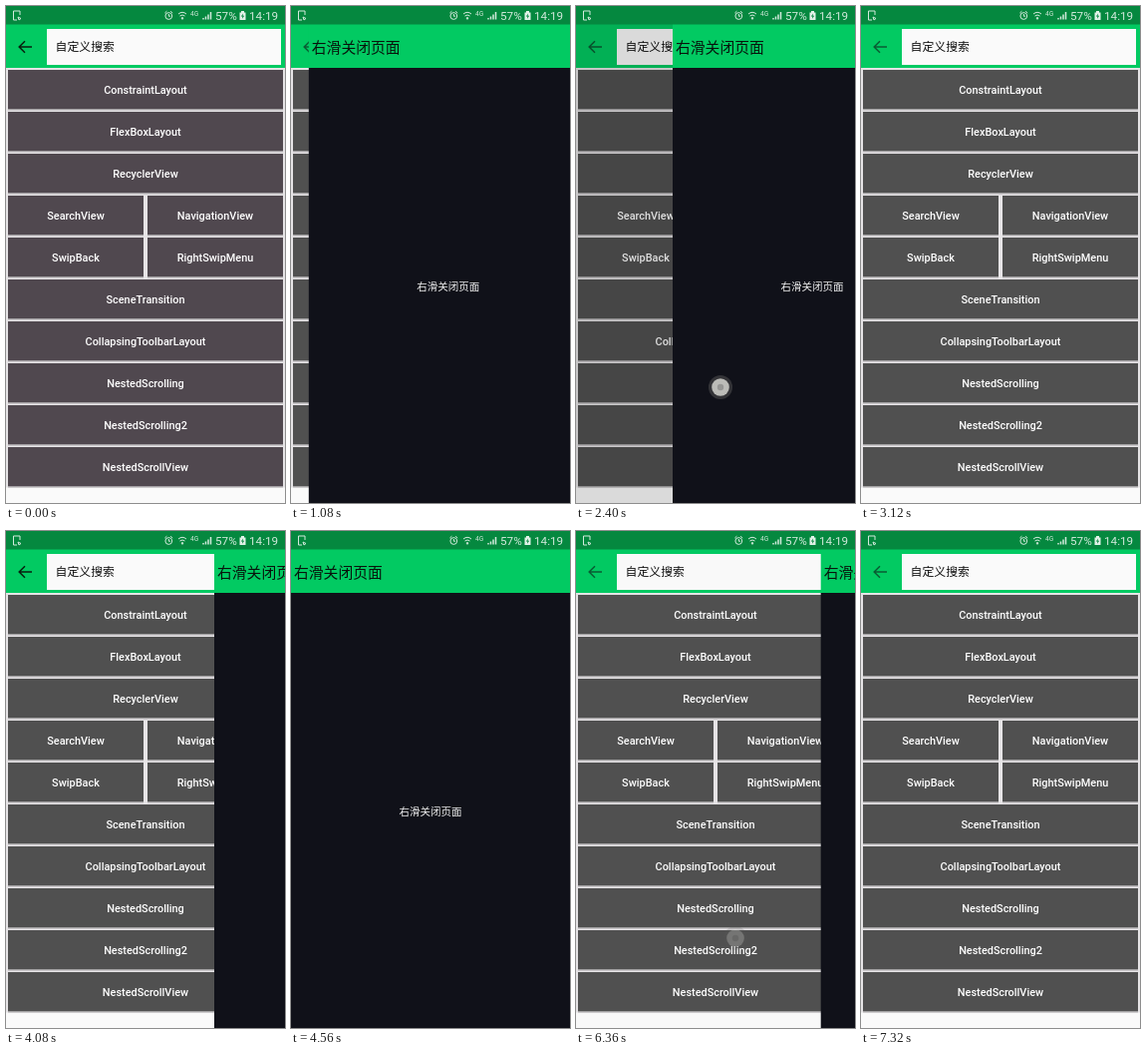
Animation, 280 px wide and 498 px high, one loop 7.44 s. Source, as an HTML page:

```html
<!DOCTYPE html>
<html lang="zh">
<head>
<meta charset="utf-8">
<style>
  html, body { margin: 0; width: 100%; height: 100%; overflow: hidden; background: #fafafa; }
  svg { display: block; width: 100%; height: 100%; }
  .cjk { font-family: "Noto Sans CJK SC", "Noto Sans CJK", sans-serif; }
  .label { font: 500 10.9px Roboto, sans-serif; fill: #fff; text-anchor: middle; }
  .status { font: 11.7px Roboto, sans-serif; fill: #d3eadc; }
</style>
</head>
<body>
<svg viewBox="0 0 280 498">
  <defs><clipPath id="body"><rect y="18" width="280" height="480"/></clipPath></defs>
  <g clip-path="url(#body)">
    <rect width="280" height="498" fill="#fafafa"/>
    <rect y="18" width="280" height="44" fill="#02ca62"/>
    <path id="arrow" d="M19 35.3L13.2 41L19 46.7M13.2 41H26" fill="none" stroke-width="1.5"/>
    <rect x="41" y="23" width="235" height="36" fill="#fafafa"/>
    <text class="cjk" x="49.5" y="45.4" font-size="11.9" fill="#111">自定义搜索</text>
    <rect y="62" width="280" height="420.5" fill="#e6e4e6"/>
    <g id="tiles"></g>
    <rect id="scrim" y="18" width="280" height="480"/>
    <g id="page">
      <rect y="18" width="280" height="44" fill="#02ca62"/>
      <rect y="62" width="280" height="436" fill="#101119"/>
      <text class="cjk" x="3" y="46.6" font-size="14.8" fill="#08140c">右滑关闭页面</text>
      <text class="cjk" x="140" y="284.8" font-size="10.5" fill="#f0f0f0" text-anchor="middle">右滑关闭页面</text>
    </g>
  </g>

  <rect width="280" height="18.5" fill="#05883f"/>
  <g fill="none" stroke="#d3eadc">
    <path d="M14 9V5H7.5V14H11M12 11L15 12.5L13 14Z"/>
    <circle cx="163.3" cy="10" r="3.4"/>
    <path d="M163.3 8V10.2H165M159.4 7L161.4 5.2M167.2 7L165.2 5.2"/>
    <path d="M173 8Q177 4.6 181 8M174.5 10Q177 8 179.5 10M176 12Q177 11.2 178 12L177 13.4Z"/>
    <path d="M198 13.5V12M200.5 13.5V10.5M203 13.5V8.5M205.5 13.5V6" stroke-width="1.5"/>
  </g>
  <path d="M234.5 6.5H236V5H239V6.5H240.5V14H234.5Z" fill="#e2f2e8"/>
  <path d="M238 7.5L235.8 10.6H237.4L236.8 13L239.2 9.8H237.6Z" fill="#05883f"/>
  <text class="status" x="185" y="10" style="font-size:6.5px">4G</text>
  <text class="status" x="210" y="14">57%</text>
  <text class="status" x="244" y="14">14:19</text>

  <g id="dot">
    <circle r="12" fill="#555" opacity=".5"/>
    <circle r="8.8" fill="#bcbcb8"/>
    <circle r="3.2" fill="#969694"/>
  </g>
</svg>
<script>
const $ = id => document.getElementById(id);
const LOOP = 7440, STEP = 120, WIDTH = 280;
const OPEN_MS = 500, CLOSE_MS = 400, FADE_MS = 320;

const rows = ['ConstraintLayout', 'FlexBoxLayout', 'RecyclerView',
  'SearchView|NavigationView', 'SwipBack|RightSwipMenu', 'SceneTransition',
  'CollapsingToolbarLayout', 'NestedScrolling', 'NestedScrolling2', 'NestedScrollView'];

// grip: distance from the finger to the page edge
const swipes = [
  { open: 706, grip: 48, path: [[1740, 40, 378], [2400, 145, 382], [2700, 195, 386]] },
  { open: 4012, grip: 32, path: [[4800, 30, 396], [5280, 82, 401], [6150, 160, 408]] }
];
const taps = [[240, 480], [3480, 3720]];

const clamp = v => Math.max(0, Math.min(1, v));
const easeOut = p => 1 - (1 - clamp(p)) ** 2;

function tile(x, y, w, name) {
  return `<rect x="${x}" y="${y + 1}" width="${w}" height="39.6" fill="#b9b7b9"/>
    <rect x="${x}" y="${y}" width="${w}" height="39.2"/>
    <text class="label" x="${x + w / 2}" y="${y + 23.9}">${name}</text>`;
}

$('tiles').innerHTML = rows.map((row, i) => {
  const names = row.split('|'), y = 64 + i * 42;
  return names.length === 1
    ? tile(2, y, 276, row)
    : names.map((name, k) => tile(2 + k * 140, y, 136, name)).join('');
}).join('');

function along(path, t) {
  const i = t < path[1][0] ? 0 : 1;
  const [a, b] = [path[i], path[i + 1]];
  const p = clamp((t - a[0]) / (b[0] - a[0]));
  return [a[1] + (b[1] - a[1]) * p, a[2] + (b[2] - a[2]) * p];
}

function pageState(t) {
  const { open, grip, path } = swipes[t < 3400 ? 0 : 1];
  const down = path[0][0], up = path[2][0];
  if (t < down) return { x: WIDTH * (1 - easeOut((t - open) / OPEN_MS)), shade: 0 };
  const [fx] = along(path, t);
  let x = Math.max(0, fx - grip);
  if (t > up) x += (WIDTH - x) * easeOut((t - up) / CLOSE_MS);
  return { x, shade: 0.3 * (1 - x / WIDTH) ** 2 };
}

function touchState(t) {
  const fade = up => 1 - clamp((t - up) / FADE_MS);
  for (const [down, up] of taps)
    if (t >= down && t < up + FADE_MS) return { x: 70, y: 254, alpha: fade(up) };
  for (const { path } of swipes) {
    const up = path[2][0];
    if (t >= path[0][0] && t < up + FADE_MS) {
      const [x, y] = along(path, t);
      return { x, y, alpha: fade(up) };
    }
  }
  return { x: 0, y: 0, alpha: 0 };
}

function render(t) {
  const { x, shade } = pageState(t);
  $('page').setAttribute('transform', `translate(${x.toFixed(1)} 0)`);
  $('scrim').setAttribute('opacity', shade);

  const touch = touchState(t);
  $('dot').setAttribute('transform', `translate(${touch.x} ${touch.y})`);
  $('dot').setAttribute('opacity', touch.alpha);

  const dim = (t > 1000 && t < 3400) || t > 5900;
  $('arrow').setAttribute('stroke', dim ? '#0a5c33' : '#08200f');
  $('tiles').setAttribute('fill', t < STEP ? '#50484f' : '#505050');
}

const start = performance.now();
function tick() {
  const t = (performance.now() - start) % LOOP;
  render(Math.floor(t / STEP) * STEP);
  requestAnimationFrame(tick);
}
tick();
</script>
</body>
</html>
```
